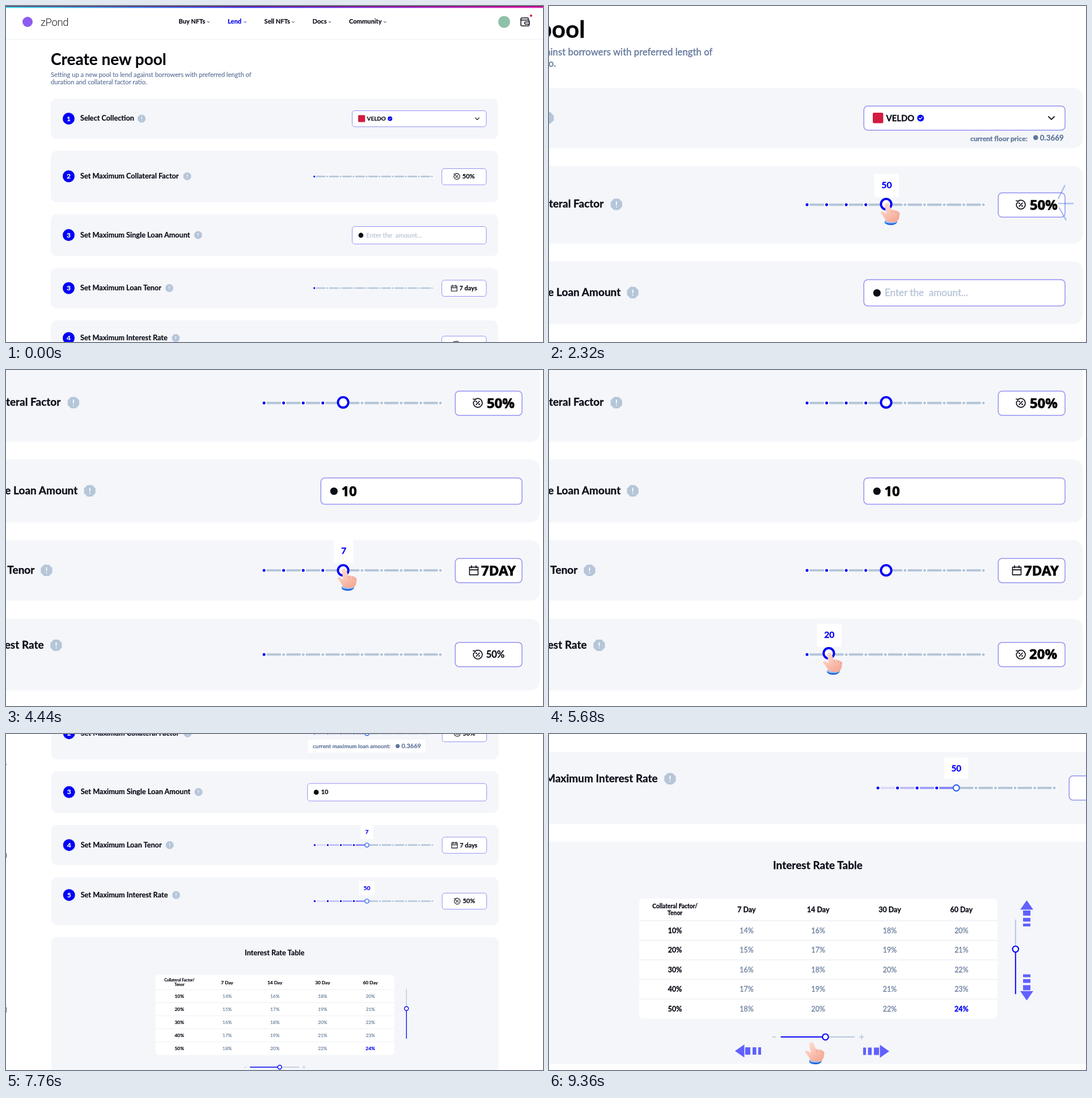
Recreate the animation shown at these times as an HTML page. Size 947 by 592 pixels, loop 10000 ms.

```html
<!DOCTYPE html>
<html lang="en">
<head>
<meta charset="utf-8">
<title>Create new pool</title>
<style>
  html, body { margin: 0; width: 100%; height: 100%; overflow: hidden; background: #fff; }
  svg { display: block; width: 947px; height: 592px; }
  text { font-family: Lato, "Noto Sans", sans-serif; font-weight: 700; white-space: pre; stroke-width: .2px; }
  .big { font-family: "Open Sans", "Noto Sans", sans-serif; stroke-width: .5px; }
  .logo { font-family: Roboto, sans-serif; font-weight: 300; letter-spacing: -.4px; stroke-width: 0; }
</style>
</head>
<body>
<svg id="stage" viewBox="0 0 947 592" xmlns="http://www.w3.org/2000/svg"></svg>
<script>
const LOOP = 10000;
const INK = '#0b0d17', BLUE = '#0000f5', GREY = '#b6c6d9', SLATE = '#60769a', CARD = '#f4f6fa', EDGE = '#9492f3';
const DOT0 = 543.7, GAP = 23.04, PAGE_B = 301.3;

// Markup helpers
const text = (x, y, s, size, { fill = INK, anchor = 'start', weight = 700, extra = '' } = {}) =>
  `<text x="${x}" y="${y}" font-size="${size}" fill="${fill}" stroke="${fill}" text-anchor="${anchor}" style="font-weight:${weight}" ${extra}>${s}</text>`;
const rect = (x, y, w, h, fill, r = 0, extra = '') =>
  `<rect x="${x}" y="${y}" width="${w}" height="${h}" rx="${r}" fill="${fill}" ${extra}/>`;
const circle = (x, y, r, fill, extra = '') => `<circle cx="${x}" cy="${y}" r="${r}" fill="${fill}" ${extra}/>`;
const path = (d, stroke, w, extra = '') =>
  `<path d="${d}" fill="none" stroke="${stroke}" stroke-width="${w}" stroke-linecap="round" stroke-linejoin="round" ${extra}/>`;
const group = (id, inner, extra = '') => `<g id="${id}" ${extra}>${inner}</g>`;
const box = (x, y, w, h) => rect(x, y, w, h, '#fff', 4.5, `stroke="${EDGE}" stroke-width="1"`);
const chevron = (x, y, r, color = INK, w = 1) => path(`M${x - r} ${y - r / 2}l${r} ${r}l${r} ${-r}`, color, w);
const card = (y, bottom) => rect(79, y, 789, bottom - y, CARD, 11);
const ring = (x, y, r, w, color = BLUE) => circle(x, y, r, '#fff', `stroke="${color}" stroke-width="${w}"`);

function info(x, y) {
  const pts = [...Array(8)].map((_, i) => {
    const a = (i + .5) * Math.PI / 4;
    return [x + 7.3 * Math.cos(a), y + 7.3 * Math.sin(a)].map(v => v.toFixed(2));
  });
  return `<polygon points="${pts.join(' ')}" fill="${GREY}"/>` +
    path(`M${x} ${y - 3}v3.4M${x} ${y + 2.9}v.1`, '#fff', 1.2);
}

const heading = (n, label, y, infoX) =>
  circle(110.5, y, 10.5, BLUE) +
  text(110.5, y + 4.2, n, 12, { fill: '#fff', anchor: 'middle' }) +
  text(131, y + 3.9, label, 12.7) + info(infoX, y);

const dot = (i, y, fill) =>
  circle(DOT0 + i * GAP, y, 2.7, '#fff') + circle(DOT0 + i * GAP, y, 1.7, fill);

function track(y, done = 0) {
  let s = '';
  for (let i = 0; i < 9; i++)
    s += rect(DOT0 + i * GAP + 3, y - 1.35, GAP - 6, 2.7, i < done ? '#8a86fa' : GREY, .8,
      i < done ? `opacity="${.25 + i * .25}"` : '');
  for (let i = 0; i < 10; i++) s += dot(i, y, i < Math.max(1, done) ? BLUE : GREY);
  return s;
}

const percentIcon = (x, y) =>
  path(`M${x - 3.2} ${y - 4.1}a5.2 5.2 0 1 1 -1.6 2.2M${x - 5.4} ${y - 4.6}l2.3 .4l-.5 2.2M${x - 1.9} ${y + 2}l3.8 -4`, INK, 1.1) +
  circle(x - 1.6, y - 1.5, .9, INK) + circle(x + 1.6, y + 1.5, .9, INK);
const calendarIcon = (x, y) =>
  path(`M${x - 5} ${y - 4}h10v9h-10zM${x - 5} ${y - .8}h10M${x - 2.6} ${y - 5.6}v2.6M${x + 2.6} ${y - 5.6}v2.6`, INK, 1.1);

const valueBox = (y, x, label, icon, id) =>
  box(768.5, y, 78.5, 28.5) + icon + text(x, y + 17.9, label, 11, { extra: `id="${id}"` });

// Cards 2 to 5, shared by both pages
function rows(k, nums, inputX, done) {
  return card(255, 346) + heading(nums[0], 'Set Maximum Collateral Factor', 300, 319.6) +
    track(300.4, done) + valueBox(286.5, 804.8, '50%', percentIcon(795, 300.4), k + 0) +
    card(366.8, 440.6) + heading(nums[1], 'Set Maximum Single Loan Amount', 403.6, 338.8) +
    box(inputX, 388.5, 847 - inputX, 30.8) + circle(inputX + 15.4, 404, 4.4, INK) +
    card(461.5, 532.6) + heading(nums[2], 'Set Maximum Loan Tenor', 497, 288) +
    track(497, done) + valueBox(483, 799.5, '7 days', calendarIcon(790.3, 497.2), k + 1) +
    card(553.8, 638) + heading(nums[3], 'Set Maximum Interest Rate', 585, 299.3) +
    track(595.8, done) + valueBox(581.6, 804.8, '50%', percentIcon(795, 596), k + 2);
}

// Sliders dragged on the first page
const byTens = p => 10 + 10 * Math.round(p * 4);
const drags = [
  { y: 300.4, ky: 299.7, from: 1560, to: 2000, out: 2480, reset: 6400, x: 805.6, base: 306, tipW: 29, val: byTens, unit: '%' },
  { y: 497, ky: 497, from: 4000, to: 4440, out: 4840, reset: LOOP, x: 799, base: 502.8, tipW: 23, val: p => 1 + Math.round(p * 6), unit: 'DAY' },
  { y: 595.8, ky: 594.4, from: 5560, to: 6000, out: 6400, reset: LOOP, x: 805, base: 600.8, tipW: 29, val: byTens, unit: '%' }
];
const dragMarkup = (d, i) =>
  group('lit' + i, [1, 2, 3].map(n => dot(n, d.y, BLUE)).join('') + ring(0, d.ky, 6.1, 2.6)) +
  group('tip' + i, rect(-d.tipW / 2, d.y - 36, d.tipW, 27, '#fff', 1.5) +
    text(0, d.y - 19.2, '', 10.5, { fill: BLUE, anchor: 'middle' })) +
  text(d.x, d.base, '', 16, { fill: '#000', extra: `id="big${i}" class="big"` });

function pageA() {
  const nav = [['Buy NFTs', 304.5, 357], ['Lend', 391, 421.7], ['Sell NFTs', 455.6, 506.6], ['Docs', 540.6, 571], ['Community', 605, 668.3]];
  return rect(0, 0, 947, 3.4, 'url(#bar)') + rect(0, 0, 947, 1.2, '#7c1745') +
    rect(0, 58, 947, 1, '#eceef3') +
    circle(38, 28, 9, '#8b5cf0') + text(61, 34.5, 'zPond', 18.5, { fill: '#222', weight: 300, extra: 'class="logo"' }) +
    nav.map(([s, x, c]) => {
      const fill = s === 'Lend' ? BLUE : INK;
      return text(x, 31.4, s, 11.1, { fill }) + chevron(c, 28.3, 1.8, fill, .9);
    }).join('') +
    circle(878.5, 28, 10.5, '#8fc0a9') +
    path('M921 24.5v-2.5q0 -1 -1 -1h-10q-2 0 -2 2v10q0 2 2 2h11q1.5 0 1.5 -1.5v-1.5M908 23q0 1.8 2 1.8h11q1.5 0 1.5 1.5v1.5M916.5 28h6.5v4h-6.5q-2 0 -2 -2t2 -2z', INK, 1.5) +
    circle(926, 17, 2, '#e0103a') +
    text(79, 104, 'Create new pool', 28, { fill: '#05060c' }) +
    ['Setting up a new pool to lend against borrowers with preferred length of', 'duration and collateral factor ratio.']
      .map((s, i) => text(79, 125.2 + i * 13.2, s, 11.2, { fill: SLATE, weight: 400 })).join('') +
    card(163, 234) + heading(1, 'Select Collection', 198.4, 239.2) +
    box(610.5, 184.5, 236.5, 28.3) + rect(621, 192.3, 12.3, 12.3, '#d21c40', 1.5) +
    text(636.6, 202, 'VELDO', 9.9) +
    circle(677.2, 198.6, 4, BLUE) + path('M675.4 198.7l1.3 1.3l2.4 -2.6', '#fff', .9) +
    chevron(831, 198.6, 3.4, INK, 1.2) +
    group('floor', text(735.7, 225.4, 'current floor price:', 8.1, { fill: SLATE }) + circle(812.5, 221.6, 2.9, SLATE) +
      text(817.5, 224.8, '0.3669', 8.9, { fill: SLATE })) +
    rows('a', [2, 3, 3, 4], 610.5, 0) +
    text(635, 407.6, 'Enter the\u00a0 amount...', 11.4, { fill: '#b4c2d6', weight: 400, extra: 'id="hint"' }) +
    text(634.6, 409.4, '10', 16, { fill: '#000', extra: 'id="amount" class="big"' }) +
    drags.map(dragMarkup).join('');
}

const fixedKnob = (y, label, w) => {
  const x = DOT0 + 4 * GAP;
  return ring(x, y, 3.6, 1.4, '#2f62f2') + rect(x - w / 2, y - 35.6, w, 25, '#fff', 1.5) +
    `<path d="M${x - 3} ${y - 11}h6l-3 3z" fill="#fff"/>` +
    text(x, y - 19.2, label, 10.2, { fill: BLUE, anchor: 'middle' });
};

function rateTable() {
  const mid = { anchor: 'middle' }, col = c => 263 + 84.2 * (c + .5);
  let s = rect(263, 725.8, 421, 141, '#fff', 5) +
    text(col(0), 737, 'Collateral Factor/', 6.9, mid) + text(col(0), 745, 'Tenor', 6.9, mid);
  [7, 14, 30, 60].forEach((d, i) => s += text(col(i + 1), 741.9, d + ' Day', 8.3, mid));
  for (let r = 0; r < 5; r++) {
    const y = 751.8 + 23 * r;
    s += rect(263, y - .4, 421, .8, '#e8ecf2') + text(col(0), y + 14.4, (r + 1) * 10 + '%', 8.3, mid);
    for (let c = 0; c < 4; c++) {
      const best = r === 4 && c === 3;
      s += text(col(c + 1), y + 14.4, 14 + r + 2 * c + '%', 8.3,
        { anchor: 'middle', fill: best ? BLUE : '#6b7f9e', weight: best ? 700 : 400 });
    }
  }
  return s;
}

function pageB() {
  return rows('b', [2, 3, 4, 5], 531, 4) +
    fixedKnob(300.4, '50', 28) + fixedKnob(497, '7', 22) + fixedKnob(595.8, '50', 28) +
    text(555, 407.4, '10', 11) +
    rect(532, 311.3, 207, 23, '#fff', 1) + text(540.4, 326.6, 'current maximum loan amount:', 9.9, { fill: SLATE }) +
    circle(690, 322.6, 3.6, SLATE) + text(696.8, 326.4, '0.3669', 11, { fill: SLATE }) +
    card(659, 920) + text(473, 691.2, 'Interest Rate Table', 12.7, { anchor: 'middle' }) + rateTable() +
    path('M705.5 751v35', GREY, 1.3) + path('M705.5 785v52.5', BLUE, 1.3) + ring(705.5, 785.1, 3.5, 1.4) +
    path('M482 888.3h34', GREY, 1.3) + path('M430 888.3h52', BLUE, 1.3) + ring(482, 888.3, 3.5, 1.4) +
    path('M420 888.3h3.4M522.3 888.3h4.6M524.6 886v4.6', GREY, 1);
}

const arrow = id => group(id, '<path d="M0 0L11.5 16.5H-11.5Z"/>' +
  [[18, 9], [31, 6.5], [41, 5]].map(([y, h]) => rect(-6.5, y, 13, h, '#6161ff')).join(''), 'fill="#6161ff"');

const hand =
  '<path d="M-4 31Q8 36 18 30V34Q15 39 7 39T-4 35Z" fill="#2467dc"/><ellipse cx="7" cy="32.5" rx="11" ry="3.5" fill="#8fc2fb"/>' +
  '<path d="M-3 1C-1 -1 3 -1 4 3L8 13C11 11 14 12 15 14C18 13 20 14 20 16C23 16 23 19 22 22C22 27 20 31 17 33Q8 36 -1 32C-4 28 -7 22 -11 18C-12 15 -9 14 -6 16L-1 19L-4 5Q-5 2 -3 1Z" fill="url(#skin)"/>' +
  path('M8 13l1.5 5M15 14l1 4M20 16.5l0 3', '#e5937f', .9);

const $ = id => document.getElementById(id);
$('stage').innerHTML =
  `<defs><linearGradient id="bar"><stop stop-color="#2fe0ee"/><stop offset=".45" stop-color="#3a3cf5"/><stop offset="1" stop-color="#ee18c0"/></linearGradient>
   <linearGradient id="skin" x2=".6" y2="1"><stop stop-color="#ffe3d8"/><stop offset="1" stop-color="#f6ab97"/></linearGradient></defs>` +
  group('pageA', pageA()) +
  group('spark', path('M10.5 -31.5L-.5 -9.5M0 0H25M1 8L12.5 28.5', '#1f55e6', 2.6)) +
  group('slide', rect(0, 0, 947, 592, '#fff') + group('zoom', `<g transform="translate(0 ${-PAGE_B})">${pageB()}</g>`)) +
  group('arrows', ['up', 'down', 'left', 'right'].map(arrow).join('')) +
  group('hand', hand);

// Timing helpers
const ramp = (t, a, b) => Math.min(1, Math.max(0, (t - a) / (b - a)));
const mix = (a, b, p) => a + (b - a) * p;
const inOut = (p, n = 3) => p < .5 ? 2 ** (n - 1) * p ** n : 1 - (2 - 2 * p) ** n / 2;
const pulse = (t, a, b, c, d) => ramp(t, a, b) * (1 - ramp(t, c, d));
const move = (id, x, y, rest = '') => $(id).setAttribute('transform', `translate(${x} ${y}) ${rest}`);
const fade = (id, o) => $(id).setAttribute('opacity', o);

const sparks = [
  { x: 899, y: 348, at: [2280, 2400, 2560, 2680] },
  { x: 906, y: 352, at: [4800, 4920, 5200, 5320] },
  { x: 900, y: 499, at: [6360, 6480, 7200, 7320] }
];
// Hand visits: fade times and the height of its fingertip
const visits = [
  { at: [880, 1000, 2400, 2560], y: 347 },
  { at: [3920, 4000, 4840, 5000], y: 350 },
  { at: [5320, 5440, 6400, 6560], y: 498 }
];

function drawDrag(d, i, t) {
  const p = ramp(t, d.from, d.to), on = t >= d.from, x = DOT0 + 93 * p, v = d.val(p);
  fade('lit' + i, on ? 1 - ramp(t, d.reset, d.reset + 160) : 0);
  [...$('lit' + i).children].forEach((c, n) => {
    if (n < 6) c.setAttribute('opacity', DOT0 + GAP * (Math.floor(n / 2) + 1) <= x ? 1 : 0);
    else c.setAttribute('cx', x);
  });
  fade('tip' + i, on ? 1 - ramp(t, d.out, d.out + 120) : 0);
  move('tip' + i, x + .6, 0);
  $('tip' + i).lastChild.textContent = v;
  $('big' + i).textContent = on ? v + d.unit : '';
  fade('a' + i, on ? 0 : 1);
}

function drawHand(t) {
  if (t >= 8480) {
    fade('hand', 1);
    return move('hand', mix(438, 463, ramp(t, 8480, 9360)), 543);
  }
  const i = visits.findIndex(v => t >= v.at[0] && t < v.at[3]);
  if (i < 0) return fade('hand', 0);
  const v = visits[i], d = drags[i];
  let x = 456 + 140 * ramp(t, d.from, d.to), y = v.y, size = 1;
  if (!i) {
    const go = inOut(ramp(t, 1280, 1560));
    x = mix(687, x, go);
    y = mix(241, y, go);
    size = mix(2.1 * inOut(ramp(t, 880, 1160)), 1, go);
  }
  fade('hand', pulse(t, ...v.at));
  move('hand', x, y, `scale(${size})`);
}

function draw(t) {
  const z = inOut(ramp(t, 80, 760)), scroll = inOut(ramp(t, 2640, 3320));
  move('pageA', -360.5 * z, -100.5 * z - 292 * scroll, `scale(${1 + z / 2})`);
  fade('floor', ramp(t, 1280, 1440));
  fade('hint', 1 - ramp(t, 3320, 3480));
  fade('amount', ramp(t, 3480, 3720));
  drags.forEach((d, i) => drawDrag(d, i, t));

  const s = sparks.find(s => t < s.at[3]) || sparks[2];
  fade('spark', pulse(t, ...s.at));
  move('spark', s.x, s.y);

  const zb = inOut(ramp(t, 7760, 8440));
  move('slide', 947 * (1 - inOut(ramp(t, 7400, 7800), 4)), 0);
  move('zoom', -235.5 * zb, -346.75 * zb, `scale(${1 + zb / 2})`);

  const p = ramp(t, 8480, 9360);
  fade('arrows', t >= 8480 ? 1 : 0);
  move('up', 842.5, 302 - 14 * ramp(p, 0, .7) + 5 * ramp(p, .7, 1));
  move('down', 842.5, 487 - 17.5 * p, 'rotate(180)');
  move('left', 352 - 24 * p, 558.5, 'rotate(-90)');
  move('right', 576 + 24 * p, 559, 'rotate(90)');
  drawHand(t);
}

const start = performance.now();
function tick() {
  draw((performance.now() - start) % LOOP);
  requestAnimationFrame(tick);
}
tick();
</script>
</body>
</html>
```
